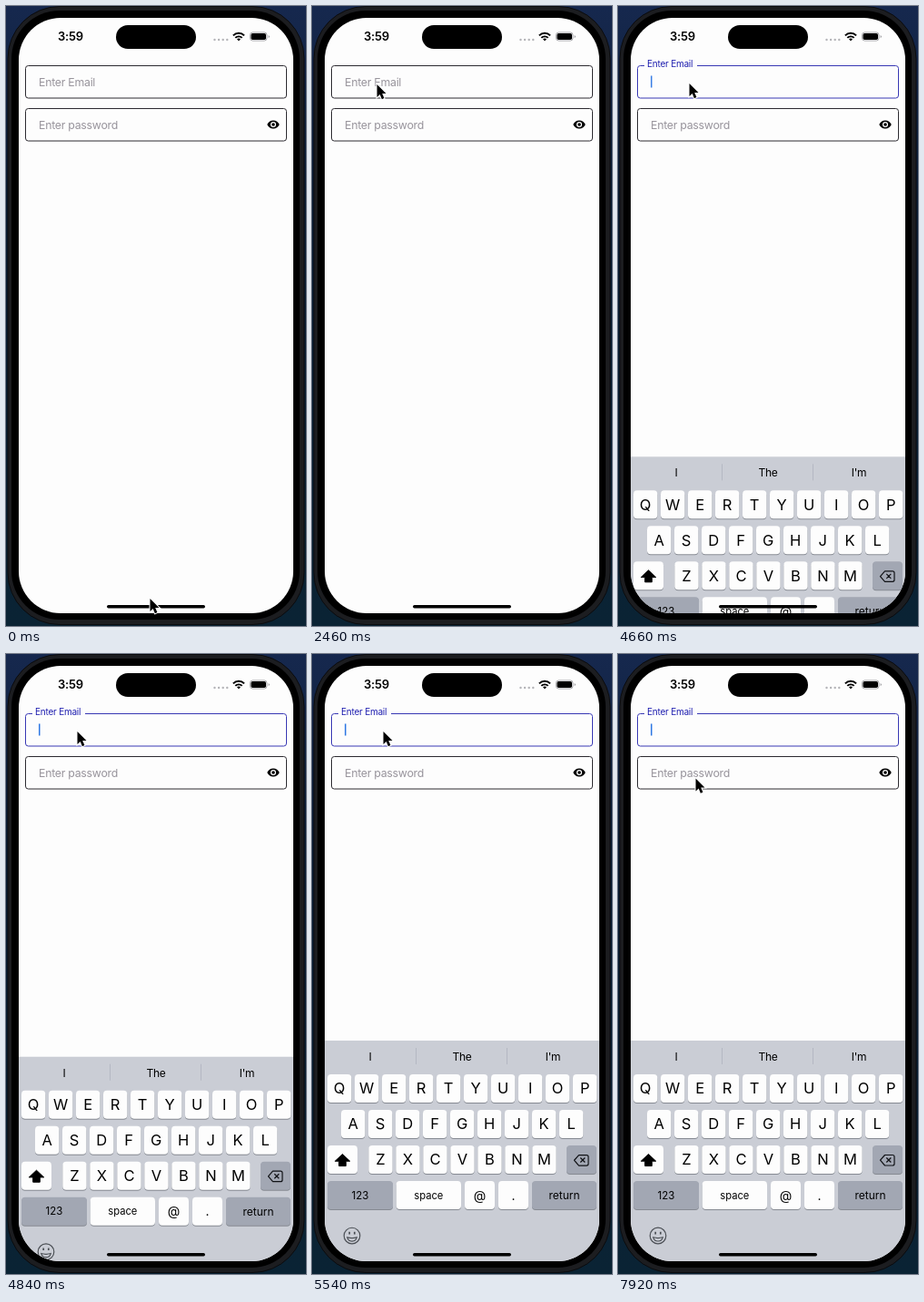
Recreate the animation shown at these times as an HTML page. Size 330x680 px, loop 8000 ms.

```html
<!DOCTYPE html>
<html lang="en">
<head>
<meta charset="utf-8">
<title>Login form</title>
<style>
  html, body { margin: 0; width: 100%; height: 100%; overflow: hidden; background: #0b1e36; }
  svg { display: block; width: 330px; height: 680px; font-family: Inter, "Open Sans", sans-serif; }
  .field { fill: none; stroke: #2c2a30; }
  .hint { font-size: 12.3px; letter-spacing: -.25px; fill: #98949c; }
  .suggestion { font-size: 12px; letter-spacing: -.2px; }
  .mid { text-anchor: middle; }
</style>
</head>
<body>
<svg viewBox="0 0 330 680">
  <defs>
    <linearGradient id="desk" x2="0" y2="1">
      <stop offset="0" stop-color="#16284e"/>
      <stop offset=".3" stop-color="#0b1e36"/>
      <stop offset="1" stop-color="#0a2334"/>
    </linearGradient>
    <clipPath id="screen"><rect x="14" y="13" width="302" height="653" rx="46"/></clipPath>
  </defs>

  <rect width="330" height="680" fill="url(#desk)"/>
  <rect x="2" y="0.5" width="326" height="678" rx="57" fill="#1c1d20" stroke="#0a0b0e"/>
  <rect x="6" y="5" width="317" height="668" rx="53"/>

  <g clip-path="url(#screen)">
    <rect x="14" y="13" width="302" height="653" fill="#fdfdfd"/>

    <text x="57" y="38" font-size="13" font-weight="600" letter-spacing="-.2">3:59</text>
    <rect x="121" y="21" width="88" height="26" rx="13"/>
    <path d="M229.5 37H244" stroke="#b4b4b8" stroke-width="2.4" stroke-linecap="round" stroke-dasharray="0 4.6"/>
    <g fill="none" stroke="#000" stroke-width="2">
      <path d="M249.9 32.4a8.6 8.6 0 0 1 12.2 0M252.3 34.9a5.3 5.3 0 0 1 7.4 0"/>
      <path d="M256 38.5l-2-2.2a3 3 0 0 1 4 0z" fill="#000" stroke="none"/>
    </g>
    <rect x="268.5" y="29" width="18.5" height="9" rx="2.8" fill="none" stroke="#a4a4a8"/>
    <rect x="269.5" y="30" width="16.5" height="7" rx="1.8"/>
    <path d="M288.6 32v3q1.4-.5 1.4-1.5t-1.4-1.5z" fill="#a4a4a8"/>

    <rect id="email" class="field" x="21.5" y="65.5" width="287" height="35.5" rx="3"/>
    <rect id="notch" x="29" y="62" width="58" height="7" fill="#fdfdfd"/>
    <text id="label" class="hint">Enter Email</text>
    <rect id="caret" x="36" y="76.5" width="1.5" height="13" fill="#2f78e4"/>

    <rect class="field" x="21.5" y="112.5" width="287" height="35.5" rx="3"/>
    <text class="hint" x="36" y="134.5">Enter password</text>
    <path transform="translate(286.7 122.7) scale(.61)" fill-rule="evenodd"
      d="M12 4.5C7 4.5 2.7 7.6 1 12c1.7 4.4 6 7.5 11 7.5s9.3-3.1 11-7.5c-1.7-4.4-6-7.5-11-7.5zM12 17a5 5 0 1 1 0-10 5 5 0 0 1 0 10zm0-8a3 3 0 1 0 0 6 3 3 0 0 0 0-6z"/>

    <g id="keyboard">
      <rect x="14" y="424" width="302" height="260" fill="#cacdd5"/>
      <path d="M114.5 432v18M214.5 432v18" stroke="#b4b8c2"/>
      <g class="suggestion mid">
        <text x="64" y="446">I</text><text x="165" y="446">The</text><text x="265" y="446">I'm</text>
      </g>
      <g id="keys"></g>
      <path d="M33.5 548.5l8.2 7.7h-4.4v5.3h-7.6v-5.3h-4.4z" stroke="#000" stroke-linejoin="round"/>
      <path d="M293.5 549.5h8.5q2 0 2 2v7.5q0 2-2 2h-8.5l-5-5.8zM295.3 552.5l5 5m0-5l-5 5"
        fill="none" stroke="#101216" stroke-width="1.2" stroke-linejoin="round"/>
      <g fill="none" stroke="#4c5056" stroke-width="1.2">
        <circle cx="44" cy="638" r="8.8"/>
        <path d="M38.8 639.8q5.2 1.6 10.4 0q-1 4.2-5.2 4.2t-5.2-4.2z"/>
        <path d="M41.2 633.8v2.6M46.8 633.8v2.6" stroke-width="1.7"/>
      </g>
    </g>
    <rect x="111" y="657" width="108" height="3.4" rx="1.7"/>
  </g>

  <path id="cursor" d="M0 0V14L3.2 11.1L5.4 16.2L7.9 15.1L5.7 10.1H10Z" stroke="#fff" stroke-width="2" paint-order="stroke"/>
</svg>

<script>
const $ = id => document.getElementById(id);
const LOOP = 8000, FOCUS = 4200, LABEL_START = 4270, KEYBOARD_START = 4400;
const WHITE = '#fdfdfd', GRAY = '#a2a7b3';

function key(x, y, width, label, size = 16.5, fill = WHITE) {
  const box = (dy, color) =>
    `<rect x="${x}" y="${y + dy}" width="${width}" height="31" rx="4" fill="${color}"/>`;
  return box(1, '#868a92') + box(0, fill) +
    `<text class="mid" x="${x + width / 2}" y="${y + 15.5 + size * .36}" font-size="${size}">${label}</text>`;
}
const letters = (row, x, y) => [...row].map((c, i) => key(x + i * 30, y, 26.3, c)).join('');

$('keys').innerHTML =
  letters('QWERTYUIOP', 17, 461) +
  letters('ASDFGHJKL', 32, 500) +
  key(17, 539, 33, '') + letters('ZXCVBNM', 62.3, 539) + key(280, 539, 33, '', 12, GRAY) +
  key(17, 578, 72, '123', 11.5, GRAY) + key(92.7, 578, 71.3, 'space', 11.2) +
  key(168, 578, 33, '@', 14) + key(205, 578, 33, '.', 14) + key(242, 578, 71, 'return', 12, GRAY);

// Pointer stops: time, x, y
const pointer = [
  [0, 158.5, 650], [700, 158.5, 650], [2000, 71.5, 86], [2500, 71.5, 86], [3000, 78.5, 85],
  [5650, 78.5, 85], [6450, 120.5, 262.5], [6850, 120.5, 262.5], [7600, 85.5, 136.5], [LOOP, 85.5, 136.5]
];
const clamp = v => Math.min(1, Math.max(0, v));
const smooth = v => v * v * (3 - 2 * v);
const mix = (a, b, p) => a + (b - a) * p;

function pointerAt(t) {
  const i = pointer.findIndex(stop => stop[0] > t);
  const [t0, x0, y0] = pointer[i - 1], [t1, x1, y1] = pointer[i];
  const p = smooth((t - t0) / (t1 - t0));
  return [mix(x0, x1, p), mix(y0, y1, p)];
}

// Steady, fade out, hidden, fade in
function blink(t) {
  const phase = ((t - 6268) / 800 % 1 + 1) % 1;
  return phase < .75 ? clamp((.65 - phase) / .15) : clamp((phase - .85) / .15);
}

function draw(t) {
  const float = smooth(clamp((t - LABEL_START) / 150));
  const focused = t >= LABEL_START;
  $('label').setAttribute('transform',
    `translate(${mix(36, 32, float)} ${mix(87.5, 67.4, float)}) scale(${mix(1, .81, float)})`);
  $('label').style.fill = focused ? '#2020b0' : '';
  $('email').style.stroke = focused ? '#3838b4' : '';
  $('notch').style.opacity = float;
  $('caret').style.opacity = t < FOCUS ? 0 : blink(t);

  const spring = Math.max(0, t - KEYBOARD_START) * .0099;
  const drop = 260 * (1 + spring) * Math.exp(-spring);
  $('keyboard').setAttribute('transform', `translate(0 ${drop})`);
  $('cursor').setAttribute('transform', `translate(${pointerAt(t)})`);
}

const start = performance.now();
function tick() {
  draw((performance.now() - start) % LOOP);
  requestAnimationFrame(tick);
}
tick();
</script>
</body>
</html>
```
